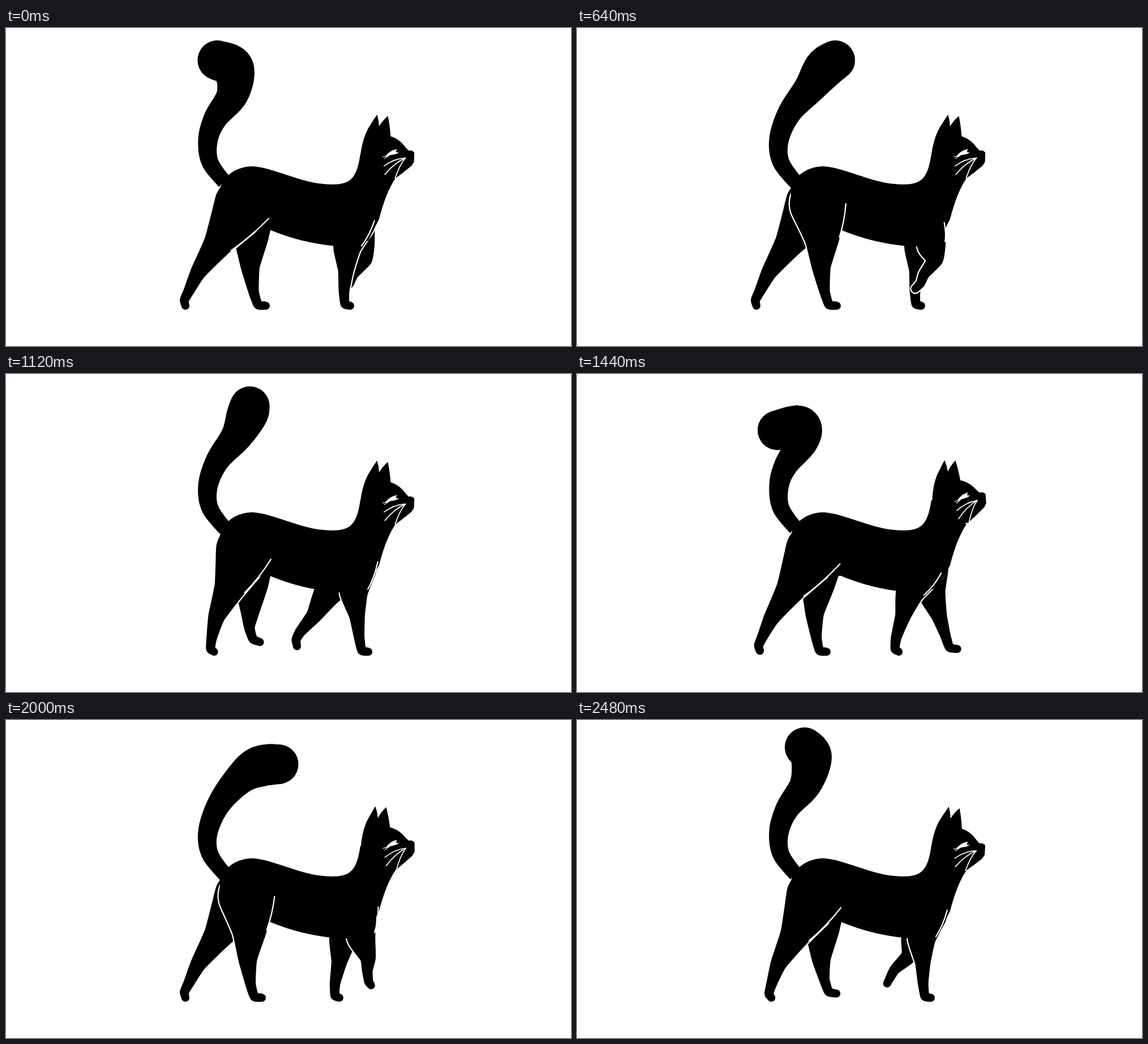
An HTML page with a canvas for the animation above (2.56 s loop, 998 px wide and 561 px high).

```html
<!DOCTYPE html>
<html lang="en">
<head>
<meta charset="utf-8">
<title>Walking cat</title>
<style>
html, body { margin: 0; width: 100%; height: 100%; overflow: hidden; background: #fff; }
canvas { display: block; }
</style>
</head>
<body>
<canvas id="stage" width="998" height="561"></canvas>
<script>
const ctx = document.getElementById("stage").getContext("2d");
const CYCLE = 1280, STEP = 80, GROUND = 490;
const { sin, cos, min, max, hypot, PI } = Math;
const lerp = (a, b, f) => a.map((v, i) => v + (b[i] - v) * f);

// Root, thigh and shin circles [x, y, radius] with the leg fully back and fully forward;
// the toe's x range, and the start and lengths of swing and stance in ms.
const hind = {
  back: [[418, 312, 50], [376, 378, 26], [340, 430, 14]],
  front: [[426, 310, 50], [433, 368, 31], [432, 420, 17]],
  toe: [317, 460], liftOff: 150, swing: 460, stance: 670, lift: 22, tuck: 0.15,
  ease: s => s * (2 - s),
  seam: [[464, 336], [475, 310]]
};
const fore = {
  back: [[618, 345, 28], [568, 383, 25], [540, 426, 14]],
  front: [[628, 345, 28], [626, 383, 25], [640, 426, 14]],
  toe: [509, 673], liftOff: 440, swing: 380, stance: 820, lift: 30, tuck: 0.6,
  ease: s => s * s * (3 - 2 * s),
  seam: [[632, 368], [663, 322]]
};

// Leg pose at time t; reach runs from 0 (back) to 1 (forward).
function pose(limb, t) {
  const p = (t - limb.liftOff + 2 * CYCLE) % CYCLE;
  const s = min(p / limb.swing, 1);
  const slide = min(max((p - limb.swing) / limb.stance, 0), 1);
  const reach = limb.ease(s) - slide ** 1.6;
  const lift = limb.lift * sin(PI * s);
  const bend = 4 * reach * (1 - reach) * lift;
  const tuck = limb.tuck * bend;

  const [root, thigh, shin] = limb.back.map((joint, i) => lerp(joint, limb.front[i], reach));
  thigh[0] += 0.9 * bend;
  shin[0] += 1.3 * bend;
  shin[1] -= 0.6 * bend;
  const x = limb.toe[0] + (limb.toe[1] - limb.toe[0]) * reach, y = GROUND - lift;
  const ankle = [x + 6 - 28 * reach + 1.4 * tuck, y - 26, 9.5];
  const heel = [x - 2 - 12 * reach + tuck, y - 2 - 8 * (1 - reach) ** 2 - 0.2 * lift, 8];
  return { reach, joints: [root, thigh, shin, ankle, heel, [x, y, 7]] };
}

// Fills the shape swept by a circle moving along smooth joints.
function sweep(joints, tension, grow = 0) {
  const N = 40, last = joints.length - 1;
  const tangent = (i, c) =>
    tension * (joints[min(i + 1, last)][c] - joints[max(i - 1, 0)][c]);
  ctx.beginPath();
  for (let i = 0; i < last; i++) {
    for (let n = 0; n <= N; n++) {
      const s = n / N, u = 1 - s;
      const [x, y, r] = [0, 1, 2].map(c =>
        joints[i][c] * u * u * (1 + 2 * s) + joints[i + 1][c] * s * s * (3 - 2 * s) +
        tangent(i, c) * s * u * u - tangent(i + 1, c) * s * s * u);
      ctx.moveTo(x + r + grow, y);
      ctx.arc(x, y, r + grow, 0, 2 * PI);
    }
  }
  ctx.fill();
}

function drawLeg({ joints }, color = "#000", grow = 0) {
  ctx.fillStyle = color;
  sweep(joints, 0.25, grow);
}

function line([x0, y0], [x1, y1], bowX, bowY, width) {
  ctx.lineWidth = width;
  ctx.beginPath();
  ctx.moveTo(x0, y0);
  ctx.quadraticCurveTo((x0 + x1) / 2 + bowX, (y0 + y1) / 2 + bowY, x1, y1);
  ctx.stroke();
}

// White line where the near leg's front edge runs into the body.
function drawSeam(limb, { reach, joints }) {
  const [, [x, y, r], [sx, sy]] = joints;
  const length = hypot(sx - x, sy - y);
  const edge = [x + r * (sy - y) / length, y - r * (sx - x) / length];
  line(lerp(...limb.seam, reach), edge, 3, 3, 2.2);
}

// The sway grows towards the tip, which traces a figure of eight.
function drawTail(a) {
  const sway = 72 * sin(a) + 18 * sin(2 * a) + 15 * sin(3 * a);
  const bob = -30 * cos(2 * a);
  ctx.fillStyle = "#000";
  sweep([
    [386, 272, 13],
    [360, 236, 15],
    [357, 196, 17.5],
    [372 + 0.06 * sway, 156 - 0.11 * sway, 21],
    [404 + 0.13 * sway, 113 - 0.13 * sway, 28],
    [414 + 0.42 * sway, 82 + 0.5 * bob, 36],
    [402 + sway, 78 + bob, 35]
  ], 0.5);
}

const body = new Path2D(`M378 284Q382 268 391 261Q410 244 436 244C470 246 520 272 560 275
  Q596 279 609 267C620 257 623 240 626 222L688 265Q671 290 659 337L640 375
  Q610 388 584 385Q520 379 466 356L430 360L388 335Q376 305 378 284Z`);
const head = new Path2D(`M624 240C626 212 632 193 640 178Q647 167 657 153Q660 163 660 174
  Q666 164 676 156Q679 172 680 192Q692 196 701 206Q706 213 711 218Q718 217 721 222
  L720 238Q716 245 714 246Q700 257 684 268L650 265Z`);
const eye = new Path2D(`M670 227C676 219 683 216 691 215C687 219 689 222 694 220
  C690 225 681 224 670 227Z`);
const lashes = new Path2D("M665 228L675 226M668 231L677 225");

function drawHead(a) {
  ctx.save();
  ctx.translate(645, 212);
  ctx.rotate((4.2 * cos(2 * a) - 4.5) * PI / 180);
  ctx.translate(-645, -212);
  ctx.fillStyle = "#000";
  ctx.fill(head);
  ctx.fillStyle = "#fff";
  ctx.fill(eye);
  ctx.lineWidth = 1.2;
  ctx.stroke(lashes);
  for (const tip of [[667, 244], [668, 259], [686, 266]]) line([705, 231], tip, -1, -6, 1.7);
  ctx.restore();
}

function draw(t) {
  const a = 2 * PI * (t - 560) / CYCLE;
  const limbs = [hind, fore];
  const near = limbs.map(limb => pose(limb, t));
  const far = limbs.map(limb => pose(limb, t + CYCLE / 2));
  ctx.fillStyle = "#fff";
  ctx.fillRect(0, 0, 998, 561);
  ctx.strokeStyle = "#fff";
  ctx.lineCap = "round";

  drawTail(a);
  far.forEach(leg => drawLeg(leg));
  near.forEach(leg => drawLeg(leg, "#fff", 2.2));
  ctx.fillStyle = "#000";
  ctx.fill(body);
  near.forEach(leg => drawLeg(leg));
  near.forEach((leg, i) => drawSeam(limbs[i], leg));
  drawHead(a);
}

function tick() {
  draw(Math.floor(performance.now() / STEP) * STEP % CYCLE);
  requestAnimationFrame(tick);
}
tick();
</script>
</body>
</html>
```
